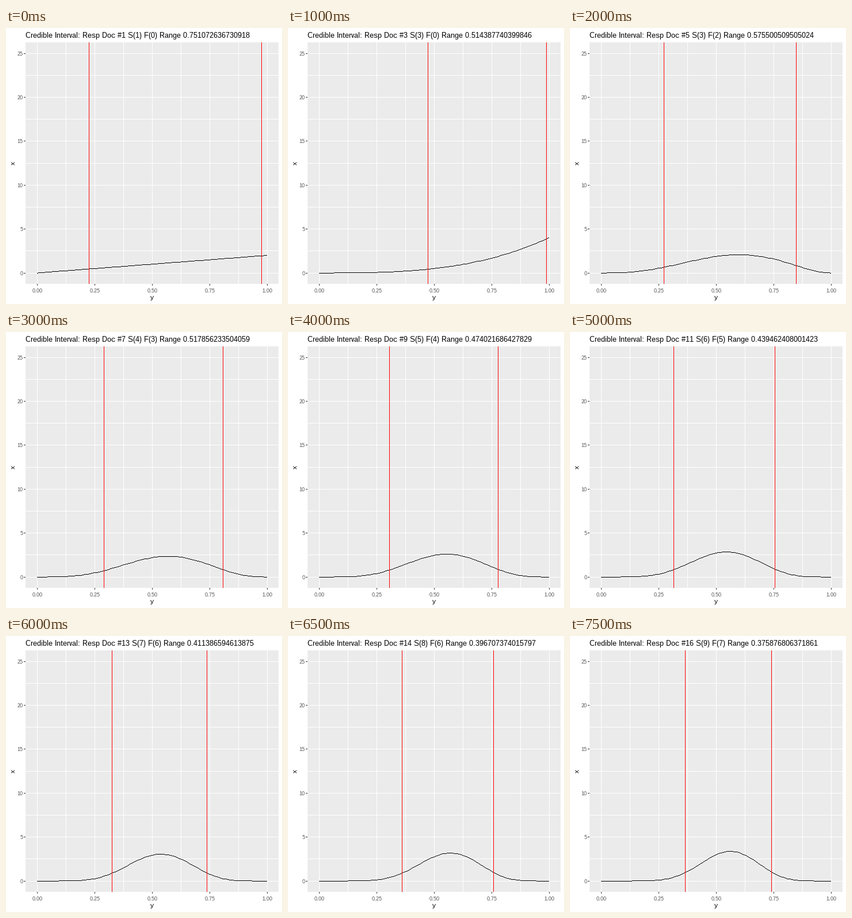
These frames come from a looping animation (480x480 px, 8 s). A matplotlib script:

```python
import math

import matplotlib.pyplot as plt
import numpy as np
from matplotlib.animation import FuncAnimation
from matplotlib.collections import PolyCollection
from matplotlib.patches import Rectangle

SIZE, DPI = 480, 72
LEFT, RIGHT, TOP, BOTTOM = 34, 474, 25, 445
X0, X_UNIT = 54.8, 400
Y0, Y_UNIT = 426.016, 381.8 / 25
OUTCOMES = "SSSFFSFFSSFFSSFS"

plt.rcParams.update({
    "font.family": "Liberation Sans",
    "text.hinting": "native",
    "text.hinting_factor": 1,
})
fig = plt.figure(figsize=(SIZE / DPI, SIZE / DPI), dpi=DPI, facecolor="white")
ax = fig.add_axes([0, 0, 1, 1])
ax.set(xlim=(0, SIZE), ylim=(SIZE, 0))
ax.axis("off")


def px(x):
    return math.floor(X0 + X_UNIT * x)


def py(y):
    return np.floor(Y0 - Y_UNIT * y)


def box(x, y, w, h, color, z=1):
    patch = Rectangle((x, y), w, h, facecolor=color, linewidth=0,
                      antialiased=False, zorder=z)
    return ax.add_patch(patch)


def vline(x, color="white", z=1):
    return box(x, TOP, 1, BOTTOM - TOP, color, z)


def hline(y):
    return box(LEFT, y, RIGHT - LEFT, 1, "white")


def label(x, y, text, size, color="black", **kw):
    return ax.text(x, y, text, fontsize=size, color=color, **kw)


def beta_cdf(x, s, f):
    n = s + f + 1
    return math.fsum(math.comb(n, j) * x**j * (1 - x)**(n - j)
                     for j in range(s + 1, n + 1))


def beta_quantile(p, s, f):
    lo, hi = 0.0, 1.0
    for _ in range(70):
        mid = (lo + hi) / 2
        if beta_cdf(mid, s, f) < p:
            lo = mid
        else:
            hi = mid
    return (lo + hi) / 2


def beta_density(x, s, f):
    scale = (s + f + 1) * math.comb(s + f, s)
    return scale * x**s * (1 - x)**f


# Panel, grid and axes
box(LEFT, TOP, RIGHT - LEFT, BOTTOM - TOP, "#ebebeb", 0)
for x in np.arange(9) / 8:
    vline(px(x))
for y in np.arange(0, 25.1, 2.5):
    hline(py(y))
for x in np.arange(5) / 4:
    box(px(x), BOTTOM, 1, 3, "#333333")
    label(px(x) + 0.3, 460, f"{x:.2f}", 9, "#4d4d4d", ha="center")
for y in range(0, 26, 5):
    box(LEFT - 3, py(y), 3, 1, "#333333")
    label(29.5, Y0 - Y_UNIT * y + 3.5, str(y), 9, "#4d4d4d", ha="right")
label(254, 472.5, "y", 11, ha="center")
label(12.5, 235.5, "x", 11, ha="center", va="center", rotation=90)

title = label(34, 17, "", 13)
curve = PolyCollection([], facecolors="black", linewidths=0,
                       antialiaseds=False, zorder=3)
ax.add_collection(curve, autolim=False)
bounds = [vline(0, "red", 4) for _ in range(2)]

grid = np.linspace(0, 1, 101)
cols = np.arange(px(0), px(1))


def draw(i):
    s = OUTCOMES[:i + 1].count("S")
    f = i + 1 - s
    limits = [beta_quantile(p, s, f) for p in (0.05, 0.95)]
    title.set_text(f"Credible Interval: Resp Doc #{i + 1} S({s}) F({f}) "
                   f"Range {limits[1] - limits[0]:.15g}")

    # One pixel per column along a polyline with whole-pixel vertices
    knots = py(beta_density(grid, s, f))
    rows = np.rint(np.interp(cols + 0.1, px(0) + X_UNIT * grid, knots))
    curve.set_verts([[(c, r), (c + 1, r), (c + 1, r + 1), (c, r + 1)]
                     for c, r in zip(cols, rows)])

    for bar, q in zip(bounds, limits):
        bar.set_x(px(q))
    return title, curve, *bounds


anim = FuncAnimation(fig, draw, frames=len(OUTCOMES), interval=500,
                     repeat=True, repeat_delay=0)
plt.show()
```
